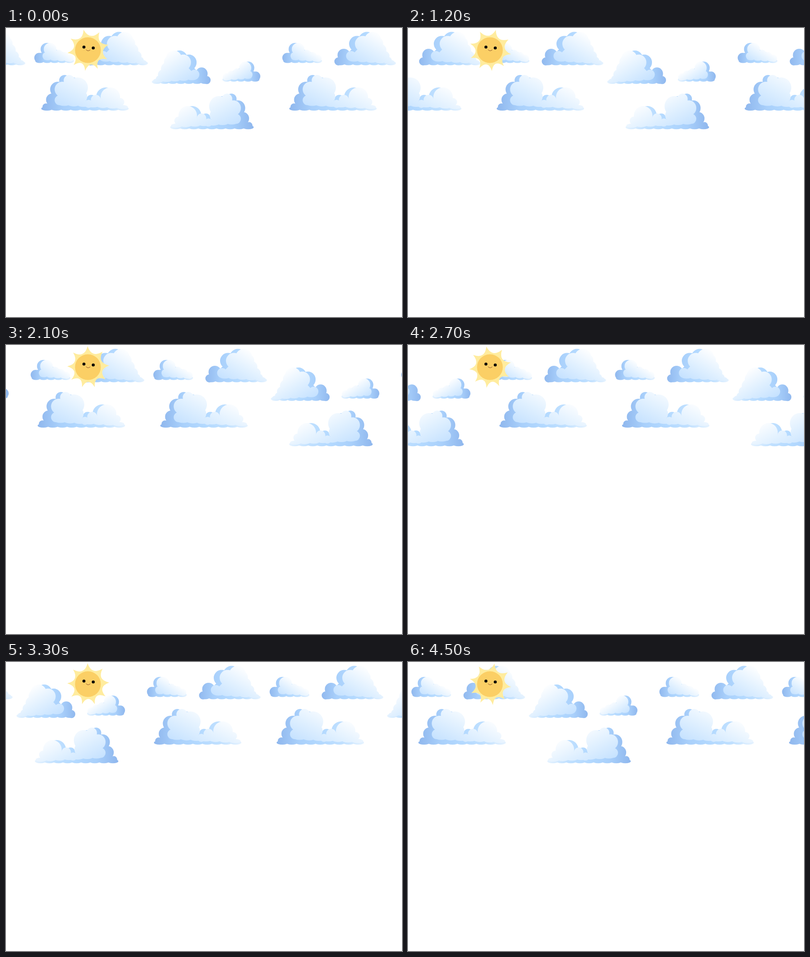
Animation of 875x640 px, one loop 4.8 s. Source, as an HTML page with a canvas:

```html
<!DOCTYPE html>
<html lang="en">
<head>
<meta charset="utf-8">
<title>Sun and clouds</title>
<style>
html, body { margin: 0; width: 100%; height: 100%; overflow: hidden; background: #fff; }
canvas { display: block; width: 875px; height: 640px; }
</style>
</head>
<body>
<canvas id="stage" width="875" height="640"></canvas>
<script>
const ctx = document.getElementById('stage').getContext('2d');
const LOOP = 4800, STEP = 300, SPAN = 819, ROW_GAP = 271;

// time in ms, drift of the clouds in px, turn of the sun in degrees
const KEYS = [
  [0, 0, 0], [600, 50, 32], [1500, 152, 82], [2100, 263, 130],
  [2700, 395, 162], [3300, 520, 210], [4500, 764, 262], [LOOP, SPAN, 280]
];

// Evenly spaced flat puffs between two points, listed from right to left
function bumps([x0, y0], [x1, y1], n) {
  const rx = (x1 - x0) / (n - 1) * .6;
  return Array.from({ length: n }, (_, i) => {
    const u = 1 - i / (n - 1);
    return [x0 + (x1 - x0) * u, y0 + (y1 - y0) * u, rx, 4.5];
  });
}

// Union of puffs [x, y, rx, ry] and the polygon through their centres
function addPuffs(path, puffs, dx = 0) {
  puffs.forEach(([x, y], i) => i ? path.lineTo(x + dx, y) : path.moveTo(x + dx, y));
  path.closePath();
  for (const [x, y, rx, ry = rx] of puffs) {
    path.moveTo(x + dx + rx, y);
    path.ellipse(x + dx, y, rx, ry, 0, 0, Math.PI * 2);
  }
}

function gradient(line, ...colours) {
  const g = ctx.createLinearGradient(...line);
  colours.forEach((c, i) => g.addColorStop(i / (colours.length - 1), c));
  return g;
}

// The shaded back repeats the front puffs, moved left, above a lower base
function cloud({ puffs, toe, shift, base, foot, span, light }) {
  const front = new Path2D(), back = new Path2D();
  addPuffs(front, [...puffs, ...bumps(...foot)]);
  addPuffs(back, puffs, -shift);
  addPuffs(back, [...toe, puffs[0], ...bumps(...base)]);
  return [
    [back, gradient([span[0], 0, span[1], 0], '#90b8ee', '#a9d0fb', '#b3d9ff', '#c0e0ff', '#e6f3ff')],
    [front, gradient(light, '#fdfeff', '#e0f0ff', '#c4e1ff')]
  ];
}

const group = [
  {
    puffs: [[27, 62, 9], [35, 47, 14], [54, 57, 9], [67, 62, 9], [79, 67, 8]],
    toe: [[11, 66, 11]], shift: 7, span: [0, 88], light: [52, 40, 28, 78],
    base: [[12, 73], [78, 73], 5], foot: [[29, 67], [75, 70], 4]
  },
  {
    puffs: [[152, 62, 11], [178, 35, 17.5], [200, 27, 18.5], [209, 34, 14],
            [216, 49, 14], [226, 62, 11], [234, 72, 8]],
    toe: [[124, 74, 9], [136, 60, 14]], shift: 13, span: [114, 251], light: [208, 10, 165, 84],
    base: [[128, 78], [240, 78], 7], foot: [[158, 70], [236, 75], 5]
  },
  {
    puffs: [[56, 160, 11], [62, 136, 17], [77, 116, 12], [96, 132, 22.5], [103, 152, 14],
            [120, 168, 9], [136, 159, 11], [168, 153, 21.5], [190, 164, 9]],
    toe: [[26, 175, 8], [40, 159, 14]], shift: 10, span: [18, 209], light: [136, 106, 92, 194],
    base: [[28, 178.5], [196, 178.5], 9], foot: [[66, 168], [194, 175], 7]
  }
].flatMap(cloud);

function drawGroup(x, y, scale) {
  ctx.save();
  ctx.translate(x, y);
  ctx.scale(scale, 1);
  for (const [path, fill] of group) {
    ctx.fillStyle = fill;
    ctx.fill(path);
  }
  ctx.restore();
}

// Repeats a group so that it wraps around the stage
function drawRow(x, y, scale) {
  const start = (x + SPAN) % SPAN;
  for (let k = -1; k <= 1; k++) drawGroup(start + k * SPAN, y, scale);
}

function dot(x, y, r, colour) {
  ctx.fillStyle = colour;
  ctx.beginPath();
  ctx.arc(x, y, r, 0, Math.PI * 2);
  ctx.fill();
}

function drawSun(turn) {
  const rays = 9;
  const at = (i, r) => {
    const a = (turn - 101 + i * 360 / rays) * Math.PI / 180;
    const b = a + .12 * Math.cos(a - .1);
    return [181.8 + r * Math.cos(b), 49 + r * Math.sin(b)];
  };
  ctx.fillStyle = '#ffec9e';
  ctx.beginPath();
  ctx.moveTo(...at(0, 46.5));
  for (let i = 0; i < rays; i++) ctx.quadraticCurveTo(...at(i + .5, 21), ...at(i + 1, 46.5));
  ctx.fill();

  dot(181, 49, 28.5, '#fbcf65');
  dot(172.2, 42.2, 3.3, '#000');
  dot(192.8, 44.2, 3.3, '#000');
  ctx.strokeStyle = '#8a5128';
  ctx.lineWidth = 1;
  ctx.lineCap = 'round';
  ctx.beginPath();
  ctx.moveTo(177, 48);
  ctx.quadraticCurveTo(181, 53, 186, 48.5);
  ctx.stroke();
}

function pose(t) {
  const i = KEYS.findIndex(k => k[0] > t);
  const a = KEYS[i - 1], b = KEYS[i];
  const u = (t - a[0]) / (b[0] - a[0]);
  return [1, 2].map(n => a[n] + (b[n] - a[n]) * u);
}

function frame(now) {
  const [drift, turn] = pose(Math.floor(now % LOOP / STEP) * STEP);
  ctx.fillStyle = '#fff';
  ctx.fillRect(0, 0, 875, 640);
  drawRow(62.5 + drift, 0, 1);
  drawRow(62.5 - ROW_GAP + drift, 0, 1);
  drawSun(turn);
  drawRow(562 + drift, 41.3, -.955);
}

const begin = performance.now();
function tick() {
  frame(performance.now() - begin);
  requestAnimationFrame(tick);
}
tick();
</script>
</body>
</html>
```
